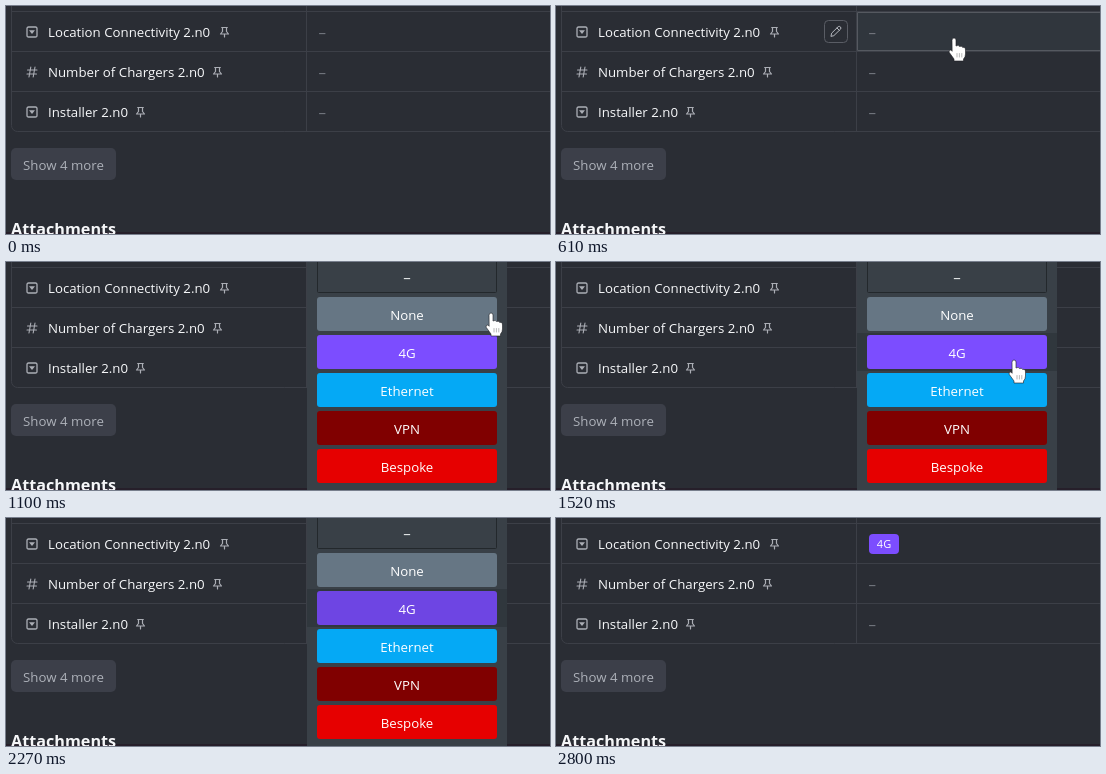
Recreate the animation shown at these times as an HTML page with a canvas. Size 544 px wide and 228 px high, loop 4.4 s.

```html
<!DOCTYPE html>
<html lang="en">
<head>
<meta charset="utf-8">
<title>Custom field picker</title>
<style>
html, body { margin: 0; width: 100%; height: 100%; overflow: hidden; background: #2a2d34; }
canvas { display: block; width: 544px; height: 228px; }
</style>
</head>
<body>
<canvas id="stage" width="544" height="228"></canvas>
<script>
const ctx = document.getElementById('stage').getContext('2d');
const LOOP = 4400, START = 400, TICK = 70;
const FONT = '"Open Sans", "Noto Sans", sans-serif';
const BG = '#2a2d34', LINE = '#3c3f47', ICON = '#abaeb5', DIM = '#73777f', PURPLE = '#7c4dff';

const rows = [
  { name: 'Location Connectivity 2.n0', pin: 218, icon: dropIcon },
  { name: 'Number of Chargers 2.n0', pin: 211, icon: hashIcon },
  { name: 'Installer 2.n0', pin: 134, icon: dropIcon }
];
const options = [
  ['None', '#667684'], ['4G', PURPLE], ['Ethernet', '#05a9f5'],
  ['VPN', '#800000'], ['Bespoke', '#e60000']
];
// Pointer path: time, x, y
const path = [
  [400, 374, 98], [470, 386, 76], [540, 394, 48], [610, 398, 33], [750, 412, 31],
  [890, 446, 33], [1030, 450, 34], [1100, 485, 52], [1240, 484, 60], [1380, 472, 86],
  [1520, 458, 99], [1660, 449, 94], [1930, 449, 94], [2010, 441, 92], [2220, 489, 74]
];

function text(str, x, y, color, size = 13.25, weight = 400, align = 'left') {
  ctx.font = `${weight} ${size}px ${FONT}`;
  ctx.textAlign = align;
  ctx.fillStyle = color;
  ctx.fillText(str, x, y);
}

function box(x, y, w, h, r, fill, stroke) {
  ctx.beginPath();
  ctx.roundRect(x, y, w, h, r);
  if (fill) { ctx.fillStyle = fill; ctx.fill(); }
  if (stroke) { ctx.strokeStyle = stroke; ctx.lineWidth = 1; ctx.stroke(); }
}

function shape(d, x, y, stroke, fill, width = 1.2) {
  const p = new Path2D(d);
  ctx.save();
  ctx.translate(x, y);
  ctx.lineJoin = ctx.lineCap = 'round';
  if (fill) { ctx.fillStyle = fill; ctx.fill(p); }
  if (stroke) { ctx.strokeStyle = stroke; ctx.lineWidth = width; ctx.stroke(p); }
  ctx.restore();
}

function dropIcon(y) {
  shape('M-3.5 -5H3.5Q5 -5 5 -3.5V3.5Q5 5 3.5 5H-3.5Q-5 5 -5 3.5V-3.5Q-5 -5 -3.5 -5Z', 26, y, ICON, null, 1.3);
  shape('M-3 -1.8H3L0 2Z', 26, y, null, ICON);
}

function hashIcon(y) {
  shape('M-1.2 -5L-3 5M3 -5L1.2 5M-4.5 -2H5M-5 2H4.5', 26, y, ICON, null, 1.1);
}

function pin(x, y) {
  shape('M-2.8 -4.5H2.8M-2 -4.5V-.5L-4 2H4L2 -.5V-4.5M0 2V5', x + .5, y, ICON, null, 1.2);
}

function pencil(y) {
  box(268.5, y - 11.5, 23, 22, 4, null, '#5a5d65');
  shape('M-5 4.5L-4.3 1.6L2.2 -4.8Q3.3 -5.6 4.4 -4.6Q5.4 -3.5 4.6 -2.4L-1.9 3.9ZM1 -3.5L3.3 -1.2', 280, y - .5, '#b5b8bf', null, 1);
}

function hand(x, y) {
  shape('M-2 1Q-2 -1 0 -1Q2 -1 2 1V7Q4.5 5.5 5.5 7.5Q8 6.5 8.7 8.5Q11.5 7.7 11.5 11V15Q11.5 18 9.5 20V22H0V20L-4.7 13.5Q-5.5 11.5 -4 11Q-3 10.7 -2 12Z',
    x, y, '#1b1e22', '#fff', .6);
  shape('M3 14.5V18M5.4 14.5V18M7.8 14.5V18', x, y, '#888', null, .6);
}

function table(hover, picked, chip) {
  box(5.5, -20, 620, 145.5, 6, null, LINE);
  ctx.fillStyle = LINE;
  for (const y of [5, 45, 85]) ctx.fillRect(5, y, 539, 1);
  ctx.fillRect(300, 0, 1, 125);
  rows.forEach((row, i) => {
    const y = 26 + 40 * i;
    row.icon(y);
    text(row.name, 42, y + 5, '#f7f8fa');
    pin(row.pin, y);
    if (i === hover) {
      box(301.5, y - 19.5, 260, 38, 0, '#30363d', '#555960');
      pencil(y);
      if (chip) box(302, y - 10, 30, 20, 1, '#38444b');
    }
    if (picked && i === 0) {
      box(313, 16, 30, 20, 4, PURPLE);
      text('4G', 328, 30, '#fff', 11, 400, 'center');
    } else {
      text('–', 312.5, y + 5.5, chip && i === hover ? '#e0e3e6' : DIM, 15);
    }
  });
}

function popup(hover, pressed) {
  ctx.fillStyle = '#394047';
  ctx.fillRect(301, 0, 200, 228);
  box(311.5, -6, 179, 36.5, 1, null, '#23282c');
  text('–', 401, 20.5, '#e4e6e9', 15, 400, 'center');
  options.forEach(([name, color], i) => {
    const y = 35 + 38 * i;
    if (i === 1 && hover) {
      ctx.fillStyle = '#30373d';
      ctx.fillRect(301, y - 2, 200, 38);
    }
    box(311, y, 180, 34, 3, i === 1 && pressed ? '#6e45e3' : color);
    text(name, 401, y + 23, '#fff', 13.25, 400, 'center');
  });
}

function pointer(t) {
  const n = path.findIndex(p => p[0] > t);
  if (n < 0) return path[path.length - 1].slice(1);
  const [t0, x0, y0] = path[n - 1], [t1, x1, y1] = path[n];
  const k = (t - t0) / (t1 - t0);
  return [x0 + (x1 - x0) * k, y0 + (y1 - y0) * k];
}

function draw(t) {
  const open = t >= 1100 && t < 2670;
  const active = t >= START && t < 2270;
  const step = START + Math.floor((t - START) / TICK) * TICK;
  const [x, y] = active ? pointer(step) : [0, 0];
  const row = active && !open ? Math.floor((y - 6) / 40) : -1;

  ctx.fillStyle = BG;
  ctx.fillRect(0, 0, 544, 228);
  ctx.fillStyle = '#261f2a';
  ctx.fillRect(0, 226, 544, 2);
  table(row, t >= 2670, t >= 960);
  box(5, 142, 105, 32, 5, '#3c3f49');
  text('Show 4 more', 17, 164, '#adb1b9');
  text('Attachments', 5, 228.5, '#f5f6f8', 16.2, 700);
  if (open) popup(t >= 2270 || y > 71, t >= 1590);
  if (active) hand(x, y);
}

function frame() {
  draw(performance.now() % LOOP);
  requestAnimationFrame(frame);
}
frame();
</script>
</body>
</html>
```
